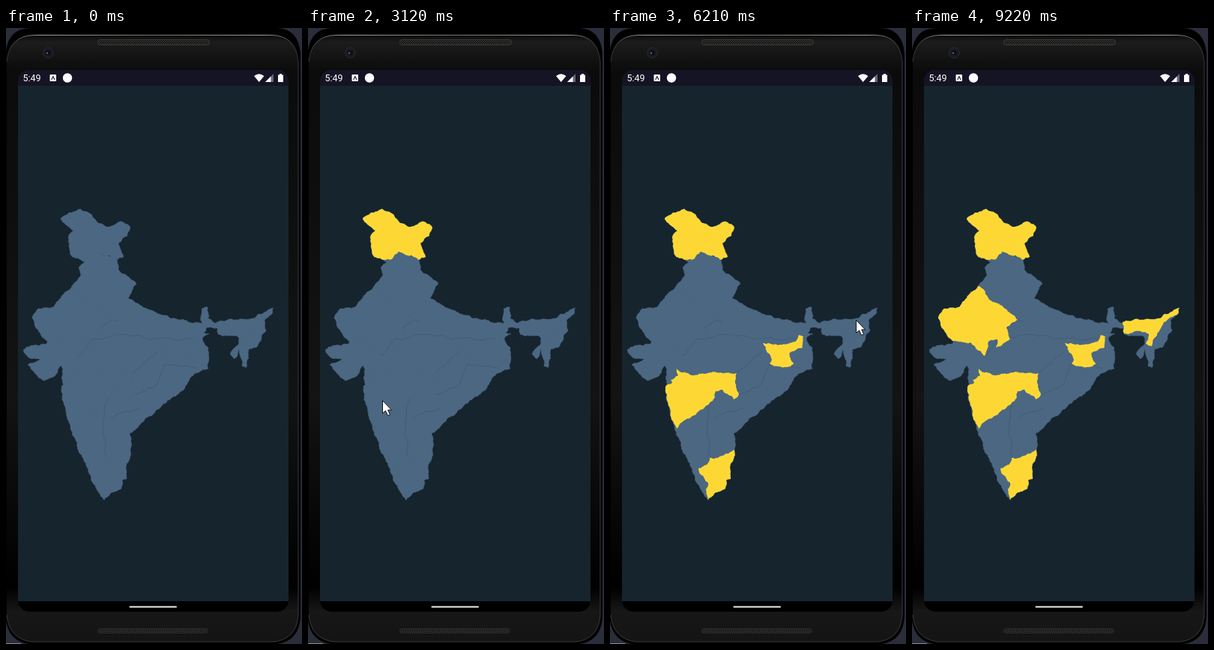
Animation of 395x821 px, one loop 9.83 s. Source, as an HTML page:

```html
<!DOCTYPE html>
<html lang="en">
<head>
<meta charset="utf-8">
<title>Map selection</title>
<style>
html, body { margin: 0; width: 100%; height: 100%; overflow: hidden; background: #2a2d3a; }
svg { display: block; width: 100vw; height: 100vh; }
</style>
</head>
<body>
<svg viewBox="0 0 395 821">
  <defs>
    <linearGradient id="shell" x2="0" y2="1">
      <stop offset="0" stop-color="#0b0b0b"/>
      <stop offset=".012" stop-color="#1c1c1c"/>
      <stop offset=".06" stop-color="#0b0b0b"/>
      <stop offset=".6" stop-color="#131313"/>
      <stop offset=".91" stop-color="#000"/>
      <stop offset=".95" stop-color="#171717"/>
      <stop offset="1" stop-color="#141414"/>
    </linearGradient>
    <linearGradient id="rim">
      <stop offset="0" stop-color="#333"/>
      <stop offset=".12" stop-color="#a0a09e"/>
      <stop offset=".5" stop-color="#747472"/>
      <stop offset=".88" stop-color="#a0a09e"/>
      <stop offset="1" stop-color="#333"/>
    </linearGradient>
    <pattern id="mesh" width="3" height="3" patternUnits="userSpaceOnUse">
      <rect width="3" height="3" fill="#141414"/>
      <path d="M0 0L3 3M3 0L0 3" stroke="#3a3a38" stroke-width=".7"/>
    </pattern>
    <clipPath id="glass"><rect x="16" y="56" width="361" height="722" rx="15"/></clipPath>
  </defs>

  <path d="M0 30Q4 1 32 0H362Q390 1 393 34V785Q391 817 362 821H30Q4 817 0 790Z" fill="#000"/>
  <path d="M1 45Q4 10 38 9H354Q387 10 390 45V782Q388 814 358 818H34Q4 814 1 782Z" fill="url(#shell)"/>
  <g fill="none">
    <path d="M1 45Q4 10 38 9.5H354Q387 10 390 45" stroke="url(#rim)"/>
    <path d="M390 45V782Q388 814 358 818H34Q4 814 1 782" stroke="#3a3a3a"/>
    <path d="M0 820.5H20" stroke="#8c8c8c"/>
  </g>
  <rect x="122.5" y="15.5" width="149" height="7" rx="3" fill="url(#mesh)" stroke="#383836"/>
  <rect x="122.5" y="800.5" width="147" height="6" rx="3" fill="url(#mesh)" stroke="#292929"/>
  <circle cx="56.5" cy="33" r="7" fill="#1a1b20" stroke="#28292d"/>
  <circle cx="56.5" cy="33" r="3.5" fill="#0c0e18"/>
  <circle cx="55" cy="33.5" r="1.2" fill="#56617f"/>

  <g clip-path="url(#glass)">
    <rect x="16" y="56" width="361" height="722" fill="#16242e"/>
    <rect x="16" y="56" width="361" height="21" fill="#151424"/>
    <rect x="16" y="764" width="361" height="14" fill="#000"/>
  </g>
  <rect x="164.5" y="770.5" width="63.5" height="2" rx="1" fill="#eee"/>

  <g fill="#fff">
    <text x="22.5" y="71" font-family="Roboto, sans-serif" font-size="12.5">5:49</text>
    <rect x="58.5" y="62" width="8.5" height="9" rx="1"/>
    <path d="M60.7 69L62.8 64.5L64.9 69" fill="none" stroke="#151424" stroke-width="1.1"/>
    <circle cx="82" cy="66.5" r="6.2"/>
    <path d="M331 64Q337.5 58.5 344.5 64L337.7 72Z"/>
    <path d="M346 72L357 61V72Z" opacity=".35"/>
    <path d="M346 72L353.5 64.5V72Z"/>
    <path d="M363 62.5H365V61H368V62.5H370V72H363Z"/>
  </g>

  <g id="land" fill="#4b6782" stroke="#4b6782" stroke-width=".4"></g>
  <g id="borders" fill="none" stroke="#314a60" stroke-width=".7" opacity=".5"></g>
  <g id="picked" fill="#fdd835"></g>
  <path id="cursor" d="M0 0V17L4 13.5L7 20L10 18.6L7.2 12.5H12Z" fill="#fff" stroke="#111"/>
</svg>
<script>
const LOOP = 9830;

// Corner points only; roughen() supplies the ragged detail
const mainland = [
  "97,306 121,298 147,306 150,322 174,341 163,360 188,374 220,387 262,394 261,374 269,372 270,387 282,393 282,400 268,399 264,406 271,408 262,414 270,426 270,454 247,465 238,481 190,518 165,540 166,562 158,590 131,629 117,608 104,577 86,533 75,490 74,450 63,465 50,470 29,449 46,441 30,439 23,429 34,423 54,421 60,400 88,344 100,329 97,319 105,312",
  "283,393 329,389 355,379 345,390 347,402 334,426 324,428 321,452 315,451 311,428 305,441 299,434 310,422 310,412 283,408"
];

const borders = [
  "97,437 114,416 152,408 195,414 250,415",
  "125,401 141,389 152,391",
  "169,460 184,447 204,430",
  "172,488 198,478 213,448 257,455",
  "136,494 129,528 133,573",
  "140,520 180,505"
];

// Tap time and outline of each selectable region
const regions = [
  [1890, "73,254 84,246 99,241 110,246 123,260 135,265 152,258 165,264 162,277 150,287 157,305 147,309 138,303 121,298 112,308 100,309 86,302 83,279 90,270 82,264"],
  [3200, "74,478 83,473 81,469 91,463 89,454 96,459 109,463 138,458 169,460 168,478 172,488 165,495 161,490 150,482 141,484 137,497 116,513 107,520 93,528 89,535 82,522"],
  [3950, "118,587 130,581 133,573 150,570 166,562 167,569 160,586 161,601 155,603 154,614 141,619 131,629 128,615 131,606 121,595"],
  [5480, "204,420 237,421 249,416 252,409 258,411 257,426 239,434 245,448 236,452 225,451 213,447 216,442"],
  [6900, "281,392 297,388 329,387 337,381 357,373 355,381 336,392 325,412 320,424 312,421 316,408 305,404 283,407"],
  [8150, "88,344 97,350 103,362 122,372 130,379 141,389 126,399 131,414 112,426 114,415 102,418 100,429 97,437 86,428 78,419 54,417 43,403 35,387 43,374 63,372 82,350"]
];

// Turning points of the cursor: time, x, y
const route = [
  [160, 325, 780], [1100, 106, 470], [1580, 105, 293], [1810, 105, 285],
  [2420, 132, 360], [3120, 99, 496], [3440, 97, 523], [4440, 175, 669],
  [5250, 250, 412], [5500, 234, 430], [5750, 253, 518], [6210, 328, 389],
  [6800, 348, 369], [7400, 303, 495], [7700, 211, 496], [8060, 96, 386],
  [8400, 89, 552], [9220, 218, 821]
];

let seed = 7;
const jitter = () => (seed = seed * 16807 % 2147483647) / 2147483647 - .5;

// Splits an edge at a displaced midpoint until the pieces are short
function fracture([ax, ay], [bx, by]) {
  const dx = bx - ax, dy = by - ay, length = Math.hypot(dx, dy);
  if (length < 3) return [[ax, ay]];
  const shift = jitter() * Math.min(.3, 3 / length);
  const mid = [(ax + bx) / 2 - dy * shift, (ay + by) / 2 + dx * shift];
  return [...fracture([ax, ay], mid), ...fracture(mid, [bx, by])];
}

function roughen(text, closed = true) {
  const points = text.split(" ").map(p => p.split(",").map(Number));
  if (closed) points.push(points[0]);
  return points.slice(1).flatMap((p, i) => fracture(points[i], p)).join(" ");
}

function add(parent, tag, points) {
  const node = document.createElementNS("http://www.w3.org/2000/svg", tag);
  node.setAttribute("points", points);
  return document.getElementById(parent).appendChild(node);
}

mainland.forEach(text => add("land", "polygon", roughen(text)));
borders.forEach(text => add("borders", "polyline", roughen(text, false)));
const picks = regions.map(([time, text]) => {
  const points = roughen(text);
  add("land", "polygon", points);
  return { time, node: add("picked", "polygon", points) };
});

const slope = (i, axis) => (route[i + 1][axis] - route[i][axis]) / (route[i + 1][0] - route[i][0]);

function tangent(i, axis) {
  if (i === 0 || i === route.length - 1) return 0;
  const a = slope(i - 1, axis), b = slope(i, axis);
  return a * b > 0 ? 2 * a * b / (a + b) : 0;
}

// Monotone cubic interpolation, so the cursor never overshoots
function position(t, axis) {
  const i = route.findIndex(p => p[0] > t) - 1;
  const p = route[i], q = route[i + 1], h = q[0] - p[0], u = (t - p[0]) / h;
  const ease = u * u * (3 - 2 * u);
  return p[axis] * (1 - ease) + q[axis] * ease
    + h * u * (1 - u) * ((1 - u) * tangent(i, axis) - u * tangent(i + 1, axis));
}

const cursor = document.getElementById("cursor");

function draw() {
  const t = performance.now() % LOOP;
  picks.forEach(({ time, node }) => node.style.display = t >= time ? "" : "none");
  const visible = t >= route[0][0] && t < route[route.length - 1][0];
  cursor.style.display = visible ? "" : "none";
  if (visible) cursor.setAttribute("transform", `translate(${position(t, 1) + .5} ${position(t, 2) + .5})`);
  requestAnimationFrame(draw);
}
draw();
</script>
</body>
</html>
```
